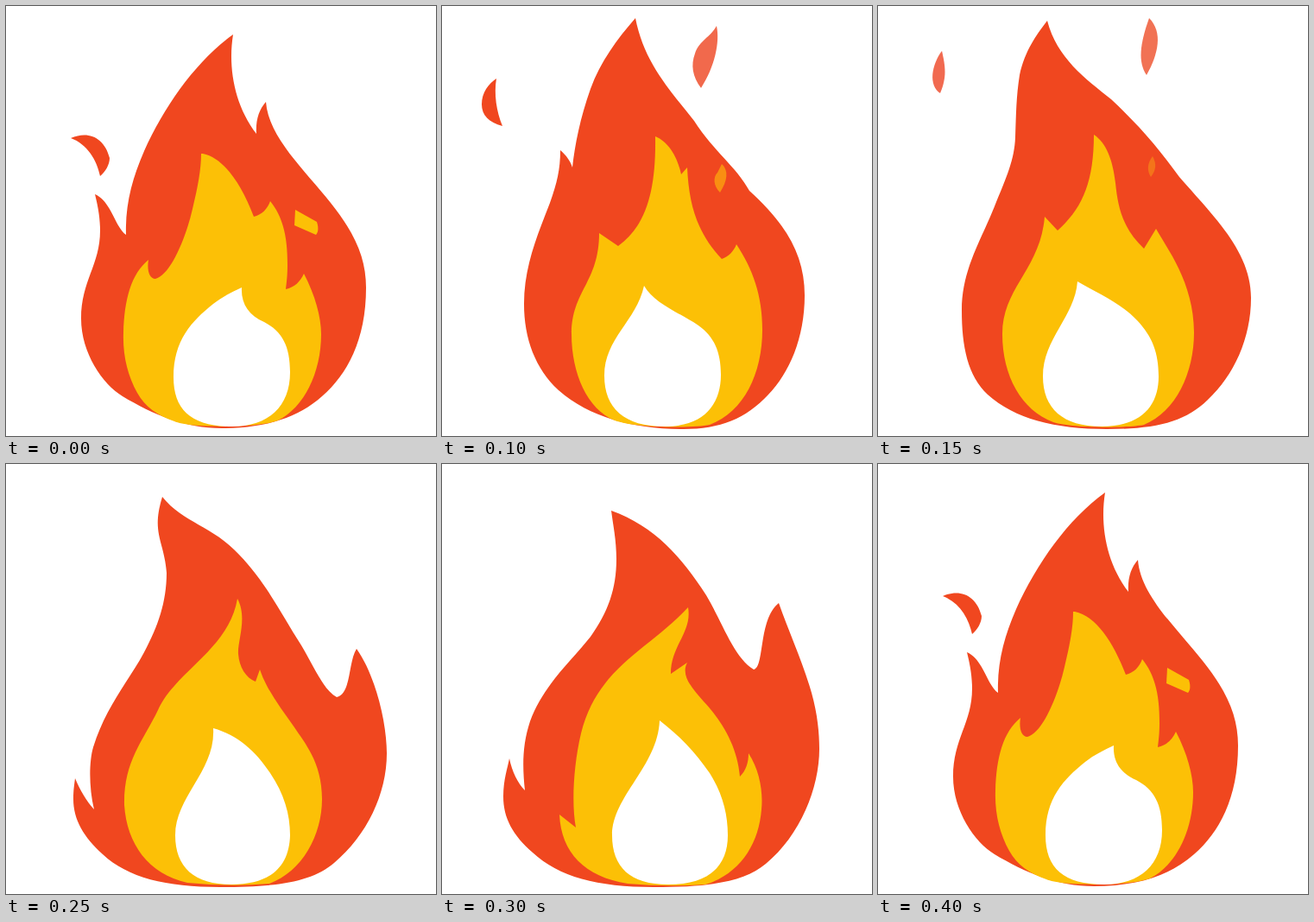
Recreate the animation shown at these times as an HTML page. Size 498 by 498 pixels, loop 0.45 s.

```html
<!DOCTYPE html>
<html lang="en">
<head>
<meta charset="utf-8">
<title>Flame</title>
<style>
  html, body { margin: 0; width: 100%; height: 100%; overflow: hidden; background: #fff; }
  .stage { position: relative; width: 498px; height: 498px; overflow: hidden; }
  /* Nine poses side by side, shown one at a time */
  .strip { position: absolute; left: 0; top: 0; display: block; animation: flicker 450ms steps(9) infinite; }
  @keyframes flicker { to { transform: translateX(-4482px); } }
  .red { fill: #f0471f; }
  .gold { fill: #fcc006; }
  .core { fill: #fff; }
</style>
</head>
<body>
<div class="stage">
<svg class="strip" width="4482" height="498" viewBox="0 0 4482 498">
  <g id="rest">
    <path class="red" d="M263,33 C257,70 264,114 290,148 C289,132 293,120 301,111 C304,152 346,190 376,228 C404,263 417,292 417,326 C417,387 395,427 366,452 C338,477 300,489 250,489 C208,489 170,473 135,452 C112,438 87,402 87,362 C87,318 109,300 109,260 C109,244 106,230 103,218 C122,226 126,256 139,265 C138,230 146,200 160,168 C184,115 220,64 263,33Z"/>
    <path class="gold" d="M228,171 C252,176 272,205 287,244 C296,242 303,235 306,226 C322,246 326,270 326,300 C326,312 325,320 324,328 C334,326 341,319 345,310 C358,335 365,360 365,380 C365,425 345,465 315,480 C292,489 212,489 195,481 C175,474 161,464 152,448 C141,428 135,405 136,378 C137,340 145,310 165,294 C163,306 166,316 173,316 C190,312 208,270 216,235 C222,210 226,190 226,171Z"/>
    <path class="core" d="M273,326 C272,345 281,358 299,366 C320,377 329,394 329,424 C329,464 304,487 262,487 C215,487 194,468 194,430 C194,387 215,365 240,345 C250,337 262,331 273,326Z"/>
    <path class="red" d="M75,153 C95,144 114,152 120,176 C120,184 115,192 109,197 C105,178 94,160 75,153Z"/>
    <path class="gold" d="M335,236 L360,250 C362,256 362,262 359,265 L334,254Z"/>
  </g>

  <g transform="translate(498)">
    <path class="red" d="M245,22 C247,66 264,104 291,140 C294,132 297,125 300,118 C306,155 343,186 365,220 C402,257 418,290 418,332 C418,385 398,428 372,455 C345,480 311,490 265,490 C213,490 170,476 135,449 C108,428 91,392 91,352 C91,310 113,282 117,244 C120,222 121,208 120,192 C132,202 141,212 146,226 C147,195 153,165 166,133 C185,92 215,55 245,22Z"/>
    <path class="gold" d="M238,161 C260,166 272,190 282,220 C288,218 293,212 295,206 C303,240 305,285 324,310 C332,306 339,300 343,293 C358,320 367,348 367,378 C367,425 348,468 312,483 C290,489 215,489 195,479 C160,465 143,425 143,379 C143,335 172,315 173,278 C176,290 182,296 188,297 C216,270 236,220 238,161Z"/>
    <path class="core" d="M254,324 C258,342 276,354 296,366 C317,378 326,396 326,424 C326,462 305,487 260,487 C214,487 191,466 191,429 C191,386 240,362 254,324Z"/>
    <path class="red" d="M60,115 C76,126 94,148 92,168 C78,164 62,142 60,115Z"/>
    <path fill="#fba80c" d="M331,208 C345,220 346,232 340,241 C327,235 324,222 331,208Z"/>
  </g>

  <g transform="translate(996)">
    <path class="red" d="M224,14 C234,65 262,95 292,133 C316,170 340,185 356,214 C398,252 420,288 420,335 C420,385 402,425 378,450 C352,478 322,490 280,490 C222,490 172,477 135,445 C108,420 95,385 95,345 C95,300 112,262 125,228 C133,205 137,190 137,167 C144,173 149,180 151,187 C154,160 160,130 172,96 C183,65 203,38 224,14Z"/>
    <path class="gold" d="M247,151 C262,157 273,175 277,195 L284,187 C286,230 295,262 324,293 C332,290 338,284 341,276 C360,305 371,335 371,375 C371,425 350,470 310,485 C290,489 225,489 200,480 C168,467 150,425 150,380 C150,330 182,320 182,263 L204,278 C236,255 248,215 247,151Z"/>
    <path class="core" d="M234,324 C246,345 275,355 297,370 C315,383 323,400 323,427 C323,462 303,487 258,487 C211,487 188,466 188,428 C188,385 225,365 234,324Z"/>
    <path class="red" d="M63,84 C60,102 63,122 70,139 C54,135 46,126 46,114 C46,100 54,90 63,84Z"/>
    <path fill="#f1694c" d="M318,23 C322,42 316,70 300,95 C290,82 288,68 293,55 C298,40 311,36 318,23Z"/>
    <path fill="#f98e12" d="M324,183 C332,190 331,202 322,216 C314,208 314,198 319,193Z"/>
  </g>

  <g transform="translate(1494)">
    <path class="red" d="M196,17 C207,60 240,84 270,108 C304,140 326,166 349,198 C390,245 432,285 432,338 C432,385 412,428 382,456 C355,482 322,490 265,490 C205,490 158,478 127,450 C104,428 97,395 97,352 C97,305 120,270 135,232 C149,198 158,178 159,152 C160,125 160,105 164,80 C170,52 183,34 196,17Z"/>
    <path class="gold" d="M250,149 C264,158 272,178 275,205 C278,235 284,258 308,281 L322,258 C334,280 366,320 366,378 C366,425 345,470 308,485 C288,489 225,489 203,482 C166,468 144,428 144,380 C144,326 188,305 193,244 L208,260 C236,235 250,205 250,149Z"/>
    <path class="core" d="M231,319 C253,332 280,343 300,364 C318,383 325,402 325,429 C325,463 305,487 259,487 C214,487 191,466 191,429 C191,385 228,360 231,319Z"/>
    <path fill="#f16a50" d="M74,52 C78,70 80,82 72,101 C58,92 62,68 74,52Z"/>
    <path fill="#f17254" d="M314,14 C330,30 325,55 311,80 C301,65 303,45 314,14Z"/>
    <path fill="#f4741a" d="M318,174 C323,183 322,190 316,198 C311,190 312,182 318,174Z"/>
  </g>

  <g transform="translate(1992)">
    <path class="red" d="M170,26 C182,58 212,68 245,82 C295,102 318,140 342,180 C368,222 390,260 405,301 C415,297 421,288 421,274 C438,295 444,318 444,340 C444,385 422,430 385,460 C358,482 320,490 250,490 C190,490 148,480 120,455 C98,435 86,415 84,391 C92,401 99,412 108,421 C100,400 100,378 100,360 C100,310 128,275 145,235 C157,200 168,165 168,138 C166,108 154,92 156,65 C157,48 164,36 170,26Z"/>
    <path class="gold" d="M252,147 C264,158 271,172 272,195 C273,230 278,255 296,269 L306,240 C316,262 318,285 336,299 C354,318 362,345 362,380 C362,425 340,470 305,485 C285,489 225,489 205,484 C165,470 138,430 138,380 C138,320 192,300 203,226 C208,230 211,236 212,242 C235,215 252,195 252,147Z"/>
    <path class="core" d="M227,316 C260,314 285,330 303,358 C320,382 327,405 326,430 C325,465 305,487 260,487 C216,487 195,467 195,430 C195,385 229,360 231,333 C231,326 228,320 227,316Z"/>
    <path fill="#f28e7c" d="M101,21 C107,38 104,58 81,64 C92,54 94,37 101,21Z"/>
    <path fill="#f07a5c" d="M307,9 C324,16 337,36 321,65 C322,45 306,35 307,9Z"/>
    <path fill="#ea551c" d="M310,166 C314,170 314,175 312,178 C309,174 308,170 310,166Z"/>
  </g>

  <g transform="translate(2490)">
    <path class="red" d="M181,38 C205,68 240,72 270,105 C302,138 320,176 342,210 C358,237 368,262 383,270 C400,266 396,230 406,214 C428,245 441,300 441,335 C441,382 418,430 380,462 C354,484 315,490 248,490 C185,490 141,479 112,452 C90,432 78,412 78,388 C78,378 79,372 80,364 C86,378 93,390 102,400 C96,375 96,345 101,328 C116,280 143,250 160,218 C176,188 186,160 186,126 C184,98 174,85 176,62 C177,52 179,45 181,38Z"/>
    <path class="gold" d="M268,156 C280,178 268,205 269,220 C270,235 278,248 289,252 L294,238 C302,262 318,282 334,305 C345,322 366,345 366,388 C366,430 343,472 305,486 Q260,490 210,485 C165,475 140,440 137,395 C136,345 158,322 176,285 C196,240 258,215 268,156Z"/>
    <path class="core" d="M240,306 C268,314 289,332 306,358 C322,382 329,405 329,430 C328,465 308,487 261,487 C218,487 196,467 196,430 C196,385 243,355 240,306Z"/>
  </g>

  <g transform="translate(2988)">
    <path class="red" d="M196,54 C246,72 278,108 306,152 C325,184 338,224 361,238 C374,236 366,180 390,161 C402,195 418,230 428,265 C435,290 437,312 437,330 C437,375 415,430 375,463 C350,484 310,490 245,490 C180,490 135,478 105,450 C82,430 71,410 71,385 C71,365 76,352 78,341 C81,356 88,370 96,378 C93,350 93,325 102,298 C118,255 150,228 172,200 C192,172 202,145 202,110 C202,88 198,70 196,54Z"/>
    <path class="gold" d="M285,166 C290,195 265,210 265,243 L284,230 C276,245 290,260 303,275 C322,295 342,325 345,362 C352,355 355,346 355,335 C368,355 372,380 370,400 C367,440 345,475 305,487 Q260,490 215,486 C165,478 138,450 136,406 L155,421 C150,395 152,350 161,312 C180,235 240,215 285,166Z"/>
    <path class="core" d="M252,297 C275,315 292,332 310,358 C325,382 331,405 331,430 C331,465 310,487 262,487 C218,487 197,467 197,430 C197,385 250,350 252,297Z"/>
  </g>

  <g transform="translate(3486)">
    <path class="red" d="M223,27 C255,34 265,75 274,110 C282,138 292,158 301,172 C310,142 330,118 353,116 C352,145 355,180 375,208 C402,245 417,285 417,328 C417,380 395,428 358,458 C330,480 295,489 250,489 C195,489 150,475 115,454 C85,435 67,400 67,362 C67,328 78,310 72,269 C93,278 105,297 113,317 C120,285 128,248 142,218 C160,183 190,160 207,115 C217,88 221,55 223,27Z"/>
    <path class="gold" d="M259,163 C252,215 285,240 313,266 C312,260 311,254 311,250 C330,265 336,285 336,310 C336,318 335,326 336,336 C343,328 352,325 360,320 C354,340 364,355 364,382 C364,425 345,465 310,483 C290,489 215,489 198,482 C160,470 135,425 135,382 C135,345 152,335 149,303 L171,329 C195,305 195,255 222,215 C233,195 246,177 259,163Z"/>
    <path class="core" d="M271,304 C290,315 312,328 325,347 C333,375 332,400 333,430 C331,465 305,487 262,487 C216,487 195,467 195,432 C195,365 262,360 271,304Z"/>
    <path class="red" d="M100,198 C106,220 88,230 76,256 C64,245 64,232 74,217 C82,207 92,204 100,198Z"/>
    <path class="gold" d="M370,267 C385,275 392,290 365,313 C356,300 380,290 370,267Z"/>
  </g>

  <use href="#rest" x="3984"/>
</svg>
</div>
</body>
</html>
```
